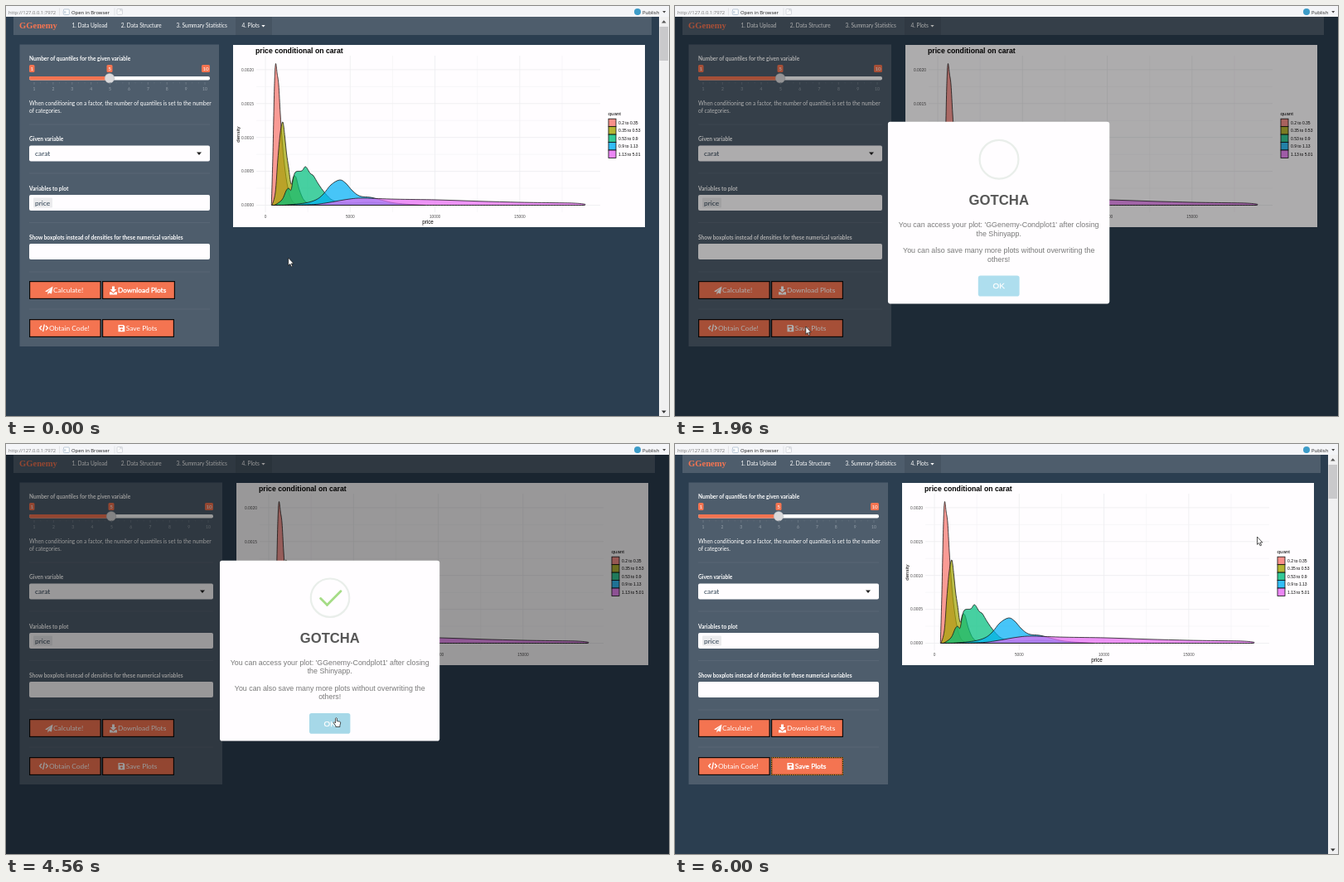
Write an HTML page that moves like this. It is 800 by 495 pixels and loops after 6.04 s.

```html
<!DOCTYPE html>
<html lang="en">
<head>
<meta charset="utf-8">
<title>Conditional plots</title>
<style>
html, body { margin: 0; width: 100%; height: 100%; overflow: hidden; background: #2b3e50; }
svg { display: block; width: 800px; height: 495px; }
text { font-family: Lato, "Open Sans", sans-serif; white-space: pre; }
.bar text { font-family: "Open Sans", "Noto Sans", sans-serif; }
.arial text { font-family: "Liberation Sans", Arial, sans-serif; }
.brand { font-family: "Liberation Serif", "Times New Roman", serif; }
.strong .label { stroke: #fff; stroke-width: .35; }
.ring { display: none; }
.focus .ring { display: inline; }
</style>
</head>
<body>
<svg id="stage" viewBox="0 0 800 495"></svg>
<script>
const LOOP = 6040, STEP = 40;
const ORANGE = '#f47451', PANEL = '#4e5d6c';

const text = (x, y, s, size, fill, more = '') =>
  `<text x="${x}" y="${y}" font-size="${size}" fill="${fill}" ${more}>${s}</text>`;
const rect = (x, y, w, h, fill, more = '') =>
  `<rect x="${x}" y="${y}" width="${w}" height="${h}" fill="${fill}" ${more}/>`;
const path = (d, fill, more = '') => `<path d="${d}" fill="${fill}" ${more}/>`;
const range = (n, f) => Array.from({ length: n }, (_, i) => f(i)).join('');
const BOLD = 'font-weight="700"', MID = 'text-anchor="middle"', END = 'text-anchor="end"';

// Smooth line through a flat list of x, y values.
function curve(flat) {
  const p = [];
  for (let i = 0; i < flat.length; i += 2) p.push([flat[i], flat[i + 1]]);
  const at = i => p[Math.max(0, Math.min(p.length - 1, i))];
  let d = 'M' + p[0];
  for (let i = 0; i < p.length - 1; i++) {
    const [a, b, c, e] = [at(i - 1), at(i), at(i + 1), at(i + 2)];
    const y = v => Math.min(240.5, v);
    d += `C${b[0] + (c[0] - a[0]) / 6} ${y(b[1] + (c[1] - a[1]) / 6)} ` +
         `${c[0] - (e[0] - b[0]) / 6} ${y(c[1] - (e[1] - b[1]) / 6)} ${c}`;
  }
  return d + 'Z';
}

const groups = [
  ['0.2 to 0.35', '#f8766d', [320.3, 240.5, 322, 180, 323.8, 100, 325.3, 70, 327.2, 82, 329, 95, 331, 130, 333, 160, 336, 192, 340, 219, 345, 235, 352, 240.5]],
  ['0.35 to 0.53', '#a3a500', [321, 240.5, 325, 225, 328, 185, 331, 153, 334, 140, 336.5, 158, 338.5, 178, 341, 195, 344, 215, 347, 206, 350, 207, 354, 222, 360, 235, 370, 240.5]],
  ['0.53 to 0.9', '#00bf7d', [324, 240.5, 333, 234, 338, 223, 341, 220, 344, 222, 347, 206, 350, 200, 357, 199, 361.5, 194, 367, 202, 371, 205, 377, 215, 385, 226, 395, 235, 412, 238, 440, 237, 470, 239, 500, 240.5]],
  ['0.9 to 1.13', '#00b0f6', [335, 240.5, 360, 238, 374, 234, 383, 227, 392, 216, 402.5, 210, 410, 214, 418, 223, 427, 229.5, 440, 231, 452, 234, 470, 238, 505, 240.5]],
  ['1.13 to 5.01', '#e76bf3', [322, 240.5, 365, 240, 385, 238, 402, 235, 418, 232.6, 433, 232, 470, 233.2, 520, 234, 570, 235.7, 620, 237, 660, 237.6, 685, 238, 698, 239.2, 698.5, 240.5]]
];

function chart() {
  const gx = i => 313 + 51.15 * i, gy = i => 240.5 - 20.45 * i;
  return `<g class="arial">` + rect(274, 47, 497, 220, '#fffdff') +
    range(8, i => path(`M${gx(i)} 60V249`, 'none', `stroke="#efeff1" stroke-width="${i % 2 ? .5 : .9}"`)) +
    range(9, i => path(`M302 ${gy(i)}H717`, 'none', `stroke="#efeff1" stroke-width="${i % 2 ? .5 : .9}"`)) +
    groups.map(g => path(curve(g[2]), g[1], 'fill-opacity=".72" stroke="#111" stroke-width=".75"')).join('') +
    path('M321 240.5H698', 'none', 'stroke="#222" stroke-width=".8" stroke-dasharray="2 1.4"') +
    text(301, 56.5, 'price conditional on carat', 8.7, '#000', BOLD) +
    range(5, i => text(299, gy(i * 2) + 1.8, (i * .0005).toFixed(4), 4.9, '#4d4d4d', END)) +
    range(4, i => text(gx(i * 2), 256, i * 5000, 4.8, '#4d4d4d', MID)) +
    text(509, 263.3, 'price', 6.3, '#000', MID) +
    text(0, 0, 'density', 6.1, '#000', MID + ' transform="translate(282.3 155) rotate(-90)"') +
    text(726.5, 132, 'quant', 6.2, '#000') +
    groups.map((g, i) => rect(727, 136.2 + 9.45 * i, 9, 9.45, g[1], 'fill-opacity=".8" stroke="#111" stroke-width=".8"') +
      text(739, 142.8 + 9.45 * i, g[0], 5, '#000')).join('') + '</g>';
}

const icons = {
  plane: path('M47 344.5L56.5 338.5 55 347.5 52 346.2 50.4 348.6V345.5L54.6 340.8 49.3 345.2Z', '#fff'),
  down: path('M128 338.5h3v3.4h2.4L129.5 346l-3.9-4.1h2.4ZM125 345.2h2.3l2.2 2 2.2-2h2.3v3.3h-9Z', '#fff'),
  code: path('M43 386L40.6 388.7 43 391.4M48 386L50.4 388.7 48 391.4M46.4 384.5L44.6 393', 'none', 'stroke="#fff" stroke-width="1.3"'),
  disk: path('M135.5 385h6.3l1.5 1.5v6.7h-7.8ZM136.8 386.2v2h4.2v-2ZM139.4 389.4a1.3 1.3 0 1 0 .01 0Z', '#fff', 'fill-rule="evenodd"')
};

const button = (id, x, y, w, icon, tx, s) =>
  `<g id="${id}">` + rect(x + .6, y + .6, w - 1.2, 20.8, ORANGE, 'stroke="#0a0a0a" stroke-width="1.2"') +
  rect(x + .6, y + .6, w - 1.2, 20.8, 'none', 'class="ring" stroke="#c98a22" stroke-width="1" stroke-dasharray="1.6 1"') +
  icons[icon] + text(tx, y + 13.9, s, 8.4, '#fff', 'class="label"') + '</g>';

// The page; extra is the width gained when the scrollbar is hidden.
function page(key, extra) {
  const wide = 218 + extra, mid = 125 + extra / 2, right = 246 + extra;
  const label = (y, s) => text(28, y, s, 6.55, '#fff', BOLD);
  const box = y => rect(28, y, wide, 19, '#fffdff', 'rx="2"');
  const badge = (x, w, s) => rect(x, 71, w, 9, ORANGE, 'rx="1.5"') + text(x + w / 2, 77.9, s, 6.2, '#fff', MID);
  const tick = i => 34 + (206 + extra) / 9 * i;
  const rule = y => path(`M28 ${y}H${right}`, 'none', 'stroke="#5b6977" stroke-width=".8"');
  return `<g id="${key}">` + rect(0, 13, 800, 482, '#2b3e50') +
    rect(9, 13, 770 + extra, 22, PANEL) + rect(277, 13, 44, 22, '#465462') +
    text(16, 27.3, 'GGenemy', 10.6, ORANGE, 'class="brand" ' + BOLD) +
    text(79.5, 26.2, '1. Data Upload', 6.55, '#fff') + text(138.8, 26.2, '2. Data Structure', 6.55, '#fff') +
    text(205.5, 26.2, '3. Summary Statistics', 6.55, '#fff') + text(284.5, 26.2, '4. Plots', 6.55, '#fff') +
    path('M308.3 23h4.4l-2.2 2.4Z', '#fff') +
    rect(16.5, 46.5, 240.5 + extra, 364.5, PANEL) +
    label(66.2, 'Number of quantiles for the given variable') +
    rect(28, 85, wide, 4.5, '#fff', 'rx="2"') + rect(28, 85, mid - 28, 4.5, ORANGE, 'rx="2"') +
    badge(28, 6.5, 1) + badge(mid - 3.5, 7, 5) + badge(right - 10, 10, 10) +
    `<circle cx="${mid}" cy="87.2" r="5.8" fill="#d9d9db" stroke="#b4b7ba" stroke-width=".5"/>` +
    range(10, i => path(`M${tick(i)} 92v3`, 'none', 'stroke="#7d8995" stroke-width=".5"') +
      text(tick(i), 101.5, i + 1, 5, '#98a2ab', MID)) +
    range(27, i => path(`M${tick(i / 3)} 92v1.5`, 'none', 'stroke="#707d8a" stroke-width=".4"')) +
    text(28, 120, 'When conditioning on a factor, the number of quantiles is set to the number', 6.6, '#fff') +
    text(28, 129, 'of categories.', 6.6, '#fff') +
    [143, 202, 261.5, 321, 366].map(rule).join('') +
    label(163.2, 'Given variable') + box(168.5) + text(35, 181, 'carat', 8.4, '#2b3e50') +
    path(`M${right - 16} 176.5h6l-3 3.4Z`, '#222') +
    label(222.5, 'Variables to plot') + box(228) + rect(33, 231.5, 23, 12, '#ebebed', 'rx="1"') +
    text(35, 240.5, 'price', 8.4, '#2b3e50') +
    label(282, 'Show boxplots instead of densities for these numerical variables') + box(287) +
    button(key + 'Calc', 28, 332, 86.7, 'plane', 57, 'Calculate!') +
    button(key + 'Load', 116, 332, 87, 'down', 135, 'Download Plots') +
    button(key + 'Code', 28, 378, 86.7, 'code', 52, 'Obtain Code!') +
    button(key + 'Save', 116, 378, 87, 'disk', 144.8, 'Save Plots') +
    `<g transform="translate(${extra} 0)">${chart()}</g>` +
    (extra ? '' : rect(788, 13, 12, 482, '#f0f0f1') + rect(788.5, 25, 10.5, 41, '#c9c9cb') +
      path('M791 20.5h5.6L793.8 17.3Z', '#555') + path('M791 488.5h5.6l-2.8 3.2Z', '#333')) + '</g>';
}

const toolbar = '<g class="bar">' + rect(0, 0, 800, 13, '#f4f5f8') +
  text(3, 9.6, 'http://127.0.0.1:7972', 5.9, '#777') +
  path('M64.5 2.5v9M131 2.5v9', 'none', 'stroke="#d5d7da" stroke-width=".6"') +
  rect(69.5, 4, 6.8, 6.5, '#fff', 'stroke="#9fb4c8" stroke-width=".7" rx=".8"') + rect(68.5, 6, 4, 3, '#d2dbe5') +
  text(79, 9.6, 'Open in Browser', 5.9, '#222') +
  rect(134, 3.5, 6.5, 6.8, '#fbfbfc', 'stroke="#c6cbd1" stroke-width=".7" rx=".8"') +
  path('M136 7.5l3-3M137.2 4.4H139.2V6.4', 'none', 'stroke="#c2c7cd" stroke-width=".6"') +
  '<circle cx="762" cy="7" r="4" fill="#3d9cc8"/>' +
  text(768, 9.6, 'Publish', 5.95, '#222') + path('M792.2 6h4l-2 2.4Z', '#444') + '</g>';

const dialog = '<g id="dialog" class="arial">' + rect(258, 140.7, 265.2, 217.8, '#fffdff', 'rx="2.8"') +
  '<g transform="translate(368.9 163.6) scale(.553)">' +
  '<circle cx="40" cy="40" r="42" fill="none" stroke="#e9eeea" stroke-width="4"/>' +
  '<rect id="tip" height="5" rx="2" fill="#a5dc86"/><rect id="long" height="5" rx="2" fill="#a5dc86"/></g>' +
  text(390.8, 240, 'GOTCHA', 16.6, '#575757', MID + ' ' + BOLD) +
  [[267.3, "You can access your plot: 'GGenemy-Condplot1' after closing"], [277.4, 'the Shinyapp.'],
   [298, 'You can also save many more plots without overwriting the'], [308.2, 'others!']]
    .map(([y, s]) => text(390.7, y, s, 8.85, '#797979', MID)).join('') +
  '<rect id="ok" x="366" y="325" width="49.4" height="24.7" rx="2.8"/>' +
  text(390.7, 340.7, 'OK', 9.8, '#fff', MID + ' stroke="#fff" stroke-width=".25"') + '</g>';

const outline = 'stroke-linejoin="round" stroke="#111" stroke-width=".7"';
const pointer = '<g id="pointer">' +
  path('M0 0V9.3L2.1 7.4 3.6 10.8 5.1 10.2 3.6 6.9H6.4Z', '#fff', 'id="arrow" ' + outline) +
  path('M-.9 .8Q0-.6 .9 .8V4L4.3 4.7Q5.4 5 5.2 6.5L4.4 9.2V11H-.7V9.6L-3.2 6.3Q-3.3 5-2 5.3L-.9 6.4Z', '#fff', 'id="hand" ' + outline) + '</g>';

document.getElementById('stage').innerHTML = page('open', 0) + page('dim', 4) +
  rect(0, 13, 800, 482, '#000', 'id="shade"') + toolbar + dialog + pointer;

const $ = id => document.getElementById(id);
const show = (id, on) => $(id).style.display = on ? '' : 'none';
const clamp = v => Math.max(0, Math.min(1, v));
const eases = {
  line: u => u,
  in: u => u * u,
  out: u => 1 - (1 - u) ** 2,
  both: u => u * u * (3 - 2 * u),
  ease(x) { // cubic-bezier(.25, .1, .25, 1)
    let u = x;
    for (let i = 0; i < 6; i++)
      u -= (.75 * u * (1 - u) + u ** 3 - x) / (.75 - 1.5 * u + 3 * u * u);
    return .3 * u * (1 - u) ** 2 + 3 * u * u * (1 - u) + u ** 3;
  }
};

// Rows: [time, values, ease used to reach the row].
function track(rows, t) {
  let i = 1;
  while (i < rows.length - 1 && t > rows[i][0]) i++;
  const [a, b] = [rows[i - 1], rows[i]];
  const u = eases[b[2] || 'ease'](clamp((t - a[0]) / (b[0] - a[0])));
  return a[1].map((v, k) => v + (b[1][k] - v) * u);
}

const POPUP = 1880, CLICK = 1200, PRESS = 5200, CLOSE = 5360;
const moves = [[0, [340.7, 304]], [640, [161.5, 388], 'both'], [1600, [161.5, 388]], [1900, [157.8, 387], 'both'],
  [2560, [157.8, 387]], [2840, [248.5, 371], 'in'], [3400, [398.5, 330.5], 'out'], [CLOSE, [398.5, 330.5]],
  [5960, [702.5, 112], 'both']];
const pop = [[0, [.7]], [.45, [1.05]], [.8, [.95]], [1, [1]]];
// width, left, top
const tipRows = [[.54, [0, 1, 19]], [.7, [50, -8, 37]], [.84, [17, 21, 48]], [1, [25, 14, 46]]];
// width, right, top
const longRows = [[.65, [0, 46, 54]], [.84, [55, 0, 35]], [1, [47, 8, 38]]];

function stroke(id, w, x, y, angle) {
  const el = $(id);
  show(id, w > .1);
  el.setAttribute('width', w);
  el.setAttribute('x', x);
  el.setAttribute('y', y);
  el.setAttribute('transform', `rotate(${angle} ${x + w / 2} ${y + 2.5})`);
}

function draw(t) {
  const modal = t >= POPUP && t < CLOSE + 160;
  const gone = clamp((t - CLOSE) / 160);
  show('open', !modal);
  show('dim', modal);
  show('shade', modal);
  show('dialog', modal);

  const [x, y] = track(moves, t);
  const overSave = x > 116 && x < 203 && y > 378;
  const overOk = x > 366 && x < 415 && y < 350 && y > 325;
  const hand = modal ? overOk : overSave;
  $('pointer').setAttribute('transform', `translate(${x} ${y})`);
  show('arrow', !hand);
  show('hand', hand);

  const saved = t >= CLICK;
  $('openLoad').classList.toggle('strong', !saved);
  $('openLoad').querySelector('rect').setAttribute('width', saved ? 85.8 : 86.8);
  $('openSave').classList.toggle('strong', saved || overSave);
  $('openSave').classList.toggle('focus', saved);
  if (!modal) return;

  $('shade').setAttribute('opacity', .4 * clamp((t - POPUP) / 100) * (1 - gone));
  const size = track(pop, (t - POPUP) / 300)[0] * (1 - .5 * gone);
  $('dialog').setAttribute('transform', `translate(390.6 249.6) scale(${size}) translate(-390.6 -249.6)`);
  $('dialog').setAttribute('opacity', 1 - gone);
  const pressed = t >= PRESS && t < CLOSE;
  $('ok').setAttribute('fill', pressed ? '#8cbfd3' : overOk ? '#a6d8e8' : '#aedeee');

  const u = (t - POPUP) / 750;
  const [tw, tl, tt] = track(tipRows, u), [lw, lr, lt] = track(longRows, u);
  stroke('tip', tw, tl, tt, 45);
  stroke('long', lw, 80 - lr - lw, lt, -45);
}

const start = performance.now();
function tick() {
  const t = (performance.now() - start) % LOOP;
  draw(Math.floor(t / STEP) * STEP);
  requestAnimationFrame(tick);
}
tick();
</script>
</body>
</html>
```
